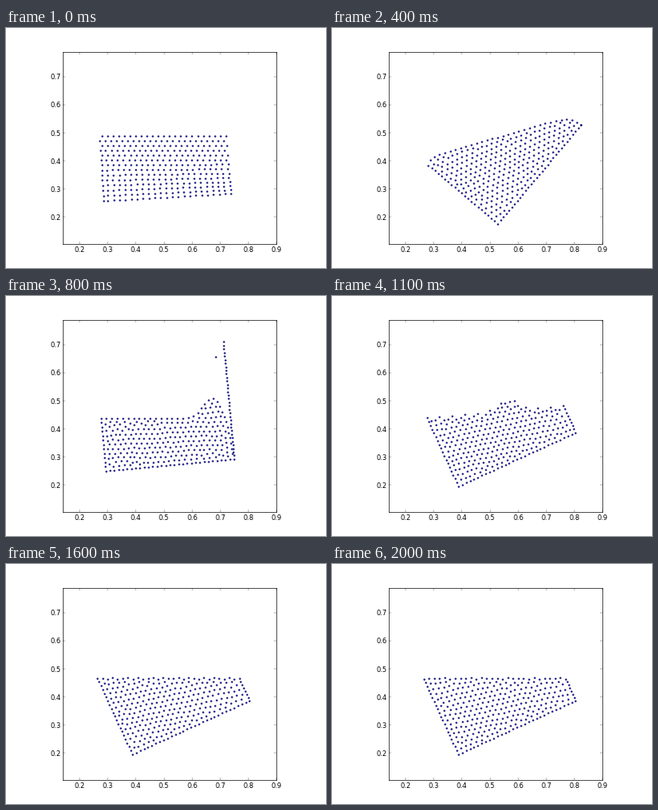
These frames come from a looping animation (400x300 px, 2.1 s). A matplotlib script:

```python
import numpy as np
import matplotlib.pyplot as plt
from matplotlib.animation import FuncAnimation
from matplotlib.path import Path

W, H, DPI = 400, 300, 100
FRAMES, INTERVAL = 21, 100
CENTER = np.array([197.5, 131.0])   # tank pivot, pixels
HALF = 80.6                         # half the tank width
COUNT = 322                         # particles


def angle(k):
    """One full rock of the tank, then a quick turn to its resting tilt."""
    if k < 9:
        return np.radians(25 * (1 - np.cos(0.542 + 0.635 * k)))
    return np.radians(24.7 * min((k - 9) / 2, 1))


def axes_of(k):
    c, s = np.cos(angle(k)), np.sin(angle(k))
    return np.array([[c, -s], [-s, -c]])    # along the floor, up the wall


def to_tank(p, k):
    return (p - CENTER) @ axes_of(k).T + [0, HALF]


def to_screen(q, k):
    return (np.asarray(q, float) - [0, HALF]) @ axes_of(k) + CENTER


def spaced(p, step):
    """Points at even steps along a polyline."""
    p = np.asarray(p, float)
    d = np.r_[0, np.cumsum(np.hypot(*np.diff(p, axis=0).T))]
    t = np.linspace(0, d[-1], max(2, int(round(d[-1] / step)) + 1))
    return np.c_[np.interp(t, d, p[:, 0]), np.interp(t, d, p[:, 1])]


def surface(k):
    """Free surface from wall to wall: slope, travelling hump, ripples."""
    s = np.linspace(0, 1, 160)
    after = max(k - 8, 0)

    level = np.interp(k, [0, 4, 8, 12, 16], [134.5, 134, 153, 146, 143])
    if k <= 8:
        slope = -55 * np.sin(np.pi * k / 8) ** 2
    else:
        slope = -15 * np.sin(np.pi * min(after, 6) / 6) ** 2
    y = level + slope * (s - 0.5)

    hump = 27 * np.clip((k - 4) / 4, 0, 1) * np.exp(-after / 5)
    y -= hump * np.exp(-((s - 0.84 + 0.027 * after ** 2) / 0.1) ** 2)
    if after:
        y += 3 * np.exp(-(k - 11) / 6) * np.sin(22 * np.pi * s + k)

    # the fluid lags behind the moving walls
    y += 10 * np.sin(np.pi * min(k, 8) / 8) ** 2 * np.exp(-s / 0.02)
    y += np.interp(k, [0, 4, 8, 11], [0, 18, 60, 0]) * np.exp((s - 1) / 0.045)

    foot = to_screen([(-HALF, 0), (HALF, 0)], k)
    y = np.minimum(y, foot[0, 1] + (foot[1, 1] - foot[0, 1]) * s)
    ends = foot[:, 0] + (y[[0, -1]] - foot[:, 1]) * np.tan(angle(k))
    x = ends[0] + (ends[1] - ends[0]) * s
    return to_tank(np.c_[x, y], k)


def relax(free, fixed, s, steps=22):
    """Spread the free points by short-range repulsion."""
    reach = 1.3 * s
    for _ in range(steps):
        d = free[:, None] - np.vstack([free, fixed])[None]
        r = np.hypot(d[..., 0], d[..., 1])
        near = (r < reach) & (r > 1e-6)
        push = np.where(near, (1 - r / reach) / np.maximum(r, 1e-6), 0)
        push[:, len(free):] *= 0.75
        move = 0.22 * s * (d * push[..., None]).sum(1)
        free = free + np.clip(move, -1.2, 1.2)
    return free


def start_block():
    """Staggered lattice whose lowest rows already follow the floor."""
    j, i = np.mgrid[0:14, 0:23]
    depth = j / 13
    odd = j % 2
    x = 120 + 7.03 * i - 3.5 * odd * (1 - depth) + 6.5 * depth * i / 22
    y = 134.5 + 6.1 * j + depth ** 3 * (2.5 - 9.5 * i / 22)
    wall = 117 + (y - 136) * 0.063
    return np.c_[np.maximum(x, wall).ravel(), y.ravel()]


def fluid(k):
    if k == 0:
        return start_block()
    top = surface(k)
    jet = np.interp(k, [4, 8, 11], [0, 147, 0])     # sheet up the right wall
    climb = max(top[-1, 1], jet)

    edge = [spaced([(-HALF, top[0, 1]), (-HALF, 0)], 5.3),
            spaced([(-HALF, 0), (HALF, 0)], 5.3)[1:],
            spaced([(HALF, 0), (HALF, climb)], 4.5)[1:],
            spaced(top, 6.8)[1:-1]]
    edge = np.vstack(edge)

    outline = np.vstack([top, [(HALF, 0), (-HALF, 0)]])
    x, y = outline.T
    area = abs(x @ np.roll(y, -1) - y @ np.roll(x, -1)) / 2
    s = np.sqrt(area / (0.866 * (COUNT - len(edge) / 2)))

    j, i = np.mgrid[-40:41, -40:41]
    grid = np.c_[(s * (i + 0.5 * (j % 2))).ravel(), (0.866 * s * j).ravel()]
    c, n = np.cos(angle(k) / 2), np.sin(angle(k) / 2)
    grid = grid @ [[c, -n], [n, c]] + [0, HALF / 2]
    rng = np.random.default_rng(k)
    grid += rng.normal(0, 0.15 * s, grid.shape)

    shape = Path(outline)
    grid = grid[shape.contains_points(grid)]
    gap = np.hypot(*(grid[:, None] - edge[None]).transpose(2, 0, 1)).min(1)
    inner = relax(grid[gap > 0.55 * s], edge, s)
    inner = inner[shape.contains_points(inner)]
    dots = to_screen(np.vstack([edge, inner]), k)
    if abs(k - 8) <= 1:     # stray drop
        dots = np.vstack([dots, (262 - 4 * (k - 8), 76 + 18 * (k - 8) ** 2)])
    return dots


poses = [fluid(k) for k in range(FRAMES)]

plt.rcParams["font.family"] = "DejaVu Sans"
fig = plt.figure(figsize=(W / DPI, H / DPI), dpi=DPI, facecolor="white")
ax = fig.add_axes([71.33 / W, 0.1, 267 / W, 0.8])
ax.set(xlim=(0.1415, 0.9), ylim=(0.1047, 0.7874),
       xticks=np.arange(2, 10) / 10, yticks=np.arange(2, 8) / 10)
ax.tick_params(direction="in", top=True, right=True, length=2, width=0.25,
               pad=2, labelsize=6)
for spine in ax.spines.values():
    spine.set_linewidth(0.5)

stage = fig.add_axes([0, 0, 1, 1])
stage.set(xlim=(0, W), ylim=(H, 0))
stage.axis("off")
dots, = stage.plot([], [], ".", ms=2.8, mfc="#0000b0", mec="#000030", mew=0.25)


def draw(k):
    dots.set_data(*poses[k].T)
    return dots,


anim = FuncAnimation(fig, draw, frames=FRAMES, interval=INTERVAL,
                     repeat=True, repeat_delay=0)
plt.show()
```
